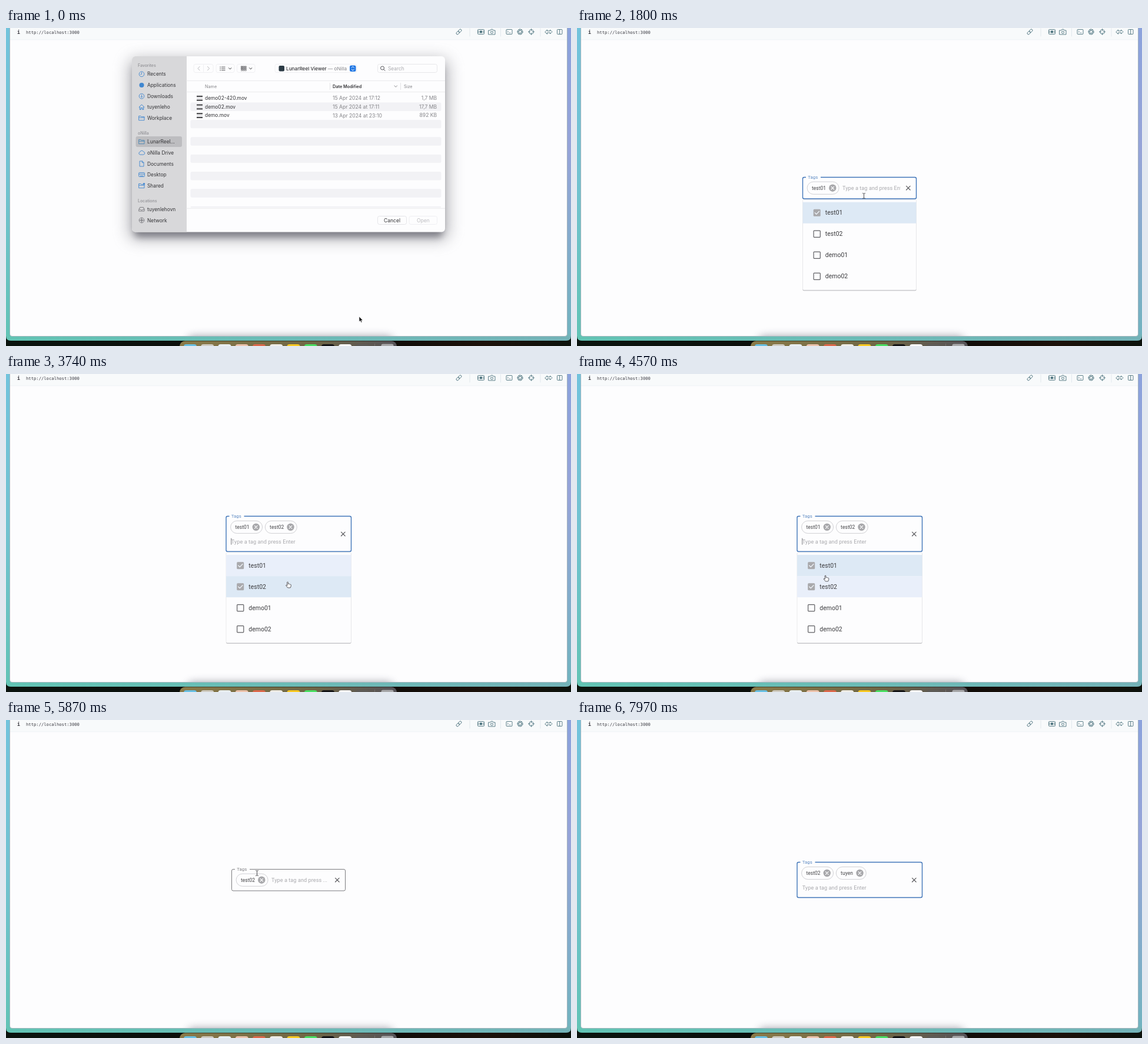
These frames come from a looping animation (960 px wide and 540 px high, 8000 ms). An HTML page:

```html
<!DOCTYPE html>
<html lang="en">
<head>
<meta charset="utf-8">
<title>Tag input</title>
<style>
html, body { margin: 0; width: 100%; height: 100%; overflow: hidden; background: #fdfdfe; }
svg { display: block; width: 960px; height: 540px; }
text { white-space: pre; }
.ui { font-family: Inter, sans-serif; }
.form { font-family: Roboto, sans-serif; letter-spacing: .008em; }
.mono { font-family: "DejaVu Sans Mono", monospace; }
.line { fill: none; stroke-linecap: round; stroke-linejoin: round; }
</style>
</head>
<body>
<svg viewBox="0 0 960 540" xmlns="http://www.w3.org/2000/svg">
  <defs>
    <linearGradient id="left" x1="0" y1="0" x2="0" y2="1">
      <stop offset="0" stop-color="#72c3dc"/><stop offset=".5" stop-color="#72c2d0"/><stop offset="1" stop-color="#62c3b6"/>
    </linearGradient>
    <linearGradient id="right" x1="0" y1="0" x2="0" y2="1">
      <stop offset="0" stop-color="#8ba2dc"/><stop offset=".4" stop-color="#96a4d8"/><stop offset="1" stop-color="#72b3c0"/>
    </linearGradient>
    <linearGradient id="base">
      <stop offset="0" stop-color="#62c4b4"/><stop offset="1" stop-color="#74b3b8"/>
    </linearGradient>
    <linearGradient id="shelf">
      <stop offset="0" stop-color="#8a7a48"/><stop offset=".6" stop-color="#6f6645"/><stop offset="1" stop-color="#555258"/>
    </linearGradient>
    <linearGradient id="ground">
      <stop offset="0" stop-color="#0b140f"/><stop offset=".6" stop-color="#0b0a08"/><stop offset=".85" stop-color="#1c110a"/><stop offset="1" stop-color="#0c120c"/>
    </linearGradient>
    <filter id="soft" x="-30%" y="-30%" width="160%" height="160%"><feGaussianBlur stdDeviation="13"/></filter>
    <filter id="near" x="-30%" y="-30%" width="160%" height="160%"><feGaussianBlur stdDeviation="6"/></filter>
    <filter id="glow" x="-10%" y="-100%" width="120%" height="300%"><feGaussianBlur stdDeviation="7"/></filter>
    <clipPath id="page"><rect x="7" y="0" width="946" height="523"/></clipPath>
    <clipPath id="side"><rect x="214" y="48" width="92.5" height="299"/></clipPath>
    <clipPath id="hint"><rect x="445" y="258" width="104.5" height="28"/></clipPath>
  </defs>
  <g id="desk"></g>
  <g id="form"></g>
  <g id="dialog"></g>
  <g id="pointer"></g>
</svg>
<script>
const LOOP = 8000, BG = '#fdfdfe';
const byId = id => document.getElementById(id);

const rect = (x, y, w, h, fill, r = 0, extra = '') =>
  `<rect x="${x}" y="${y}" width="${w}" height="${h}" rx="${r}" fill="${fill}" ${extra}/>`;
const box = (x, y, w, h, color, r = 0, width = 1, fill = 'none') =>
  rect(x, y, w, h, fill, r, `stroke="${color}" stroke-width="${width}"`);
const path = (d, color, width = 1, fill = 'none') =>
  `<path class="line" d="${d}" style="fill:${fill}" stroke="${color}" stroke-width="${width}"/>`;
const dot = (x, y, r, fill, extra = '') => `<circle cx="${x}" cy="${y}" r="${r}" fill="${fill}" ${extra}/>`;
const ring = (x, y, r, color, width = .9) => dot(x, y, r, 'none', `stroke="${color}" stroke-width="${width}"`);
// Text is placed by its vertical middle.
const label = (s, x, y, size, fill, cls = 'ui', extra = '') =>
  `<text class="${cls}" x="${x}" y="${(y + size * .36).toFixed(2)}" font-size="${size}" fill="${fill}" ${extra}>${s}</text>`;
const at = (x, y, s) => `<g transform="translate(${x} ${y})">${s}</g>`;
const cross = (x, y, r, color, width) =>
  path(`M${x - r} ${y - r}L${x + r} ${y + r}M${x + r} ${y - r}L${x - r} ${y + r}`, color, width);

function drawDesk() {
  const ink = '#4a717c';
  let s = rect(0, 0, 960, 540, 'url(#ground)');
  s += '<path d="M0 0H960V523Q960 531 952 531H8Q0 531 0 523Z" fill="url(#base)"/>';
  s += rect(0, 0, 8, 520, 'url(#left)') + rect(952, 0, 8, 520, 'url(#right)');
  s += `<path d="M6.5 -1H953.5V519Q953.5 523.5 949 523.5H11Q6.5 523.5 6.5 519Z" fill="${BG}" stroke="#9cabb4" stroke-width=".8"/>`;
  s += '<g clip-path="url(#page)">' + rect(308, 523, 350, 24, '#6c6c7c', 10, 'filter="url(#glow)" opacity=".6"') + '</g>';
  s += rect(7, 0, 946, 20, '#f8fafb') + rect(7, 19.7, 946, .6, '#e9ecee');
  s += label('i', 19, 7, 8, '#33333a', 'mono', 'font-weight="bold"');
  s += label('http://localhost:3000', 34, 7, 7.2, '#3b3b42', 'mono');

  for (const x of [788, 840.5, 908]) s += path(`M${x} 1V14`, '#dbe4ea', .8);
  s += at(769.5, 6.5, `<g transform="rotate(-45)">${box(-5.5, -2, 6, 4, ink, 2, .9)}${box(-.5, -2, 6, 4, ink, 2, .9)}</g>`);
  s += box(801.5, 2.5, 11, 8, ink, 1, .9) + dot(807, 6.5, 2.3, ink) + path('M803 4.5v4M811 4.5v4', ink, .8);
  s += path('M820 4H823L824 2.3H827L828 4H831V11H820Z', ink, .9) + ring(825.5, 7.2, 2, ink);
  s += box(850, 2.5, 10, 8, ink, 1, .9) + path('M852 5l1.5 1.3L852 7.6M855 8h2', ink, .7);
  s += ring(873.5, 6.5, 4.5, ink);
  for (let a = 0; a < 360; a += 60) s += at(873.5, 6.5, `<g transform="rotate(${a})">${path('M-1.2 -2L3 -3.3', ink, .9)}</g>`);
  s += ring(892.5, 6.5, 3.8, ink) + path('M892.5 1.5v3M892.5 8.5v3M887.5 6.5h3M894.5 6.5h3', ink, .9);
  s += path('M916 6.5L919.5 3V5H924.5V3L928 6.5L924.5 10V8H919.5V10Z', ink, .9);
  s += box(936.5, 2.5, 8.5, 8, ink, .8, .9) + path('M940.7 2.5v8', ink, .9);

  s += rect(295, 531.5, 369, 22, 'url(#shelf)', 9);
  const apps = ['#69bfe2', '#cfcbc2', '#e8eef0', '#ecc2ac', '#dc684c', '#eeece6', '#f7c822', '#4ade62', '#151517', '#f7f7f8', '#5d5b58'];
  apps.forEach((c, i) => s += rect(302 + i * 29.25, 537, 22, 12, c, 4));
  s += rect(626, 536, .8, 6, '#7b7772') + rect(637.5, 536.5, 21, 12, '#a8a8aa', 3);
  byId('desk').innerHTML = s;
}

const folder = (y, c) => path(`M226 ${y - 3.5}h3l1 1.2h5v6h-9zM226 ${y - .8}h9`, c, .9);

function drawDialog() {
  const blue = '#3f86d0', grey = '#77777c', ink = '#333336', dim = '#848488', faint = '#ececef';
  let s = rect(208, 52, 544, 308, '#76767e', 14, 'filter="url(#soft)" opacity=".5"');
  s += rect(218, 64, 524, 291, '#54545e', 8, 'filter="url(#near)" opacity=".6"');
  s += rect(214, 48, 532, 298.5, BG, 6);
  s += '<g clip-path="url(#side)">' + rect(214, 48, 110, 298.5, '#d8d8da', 6) + '</g>';
  s += rect(306, 48, .7, 298, '#d2d2d5');
  s += rect(220.5, 184, 78.5, 18, '#bdbdc0', 3);

  const heads = [['Favorites', 63.8], ['oNilla', 178.7], ['Locations', 293.3]];
  for (const [t, y] of heads) s += label(t, 224, y, 6.9, '#98989c', 'ui', 'font-weight="600"');
  const places = ['Recents', 'Applications', 'Downloads', 'tuyenleho', 'Workplace', '',
    'LunarReel…', 'oNilla Drive', 'Documents', 'Desktop', 'Shared', '', 'tuyenlehovn', 'Network'];
  places.forEach((t, i) => s += label(t, 240, 78.2 + i * 18.75 + Math.floor(i / 6) * 2.4, 8.35, ink));

  s += ring(230.5, 78.3, 4.3, blue) + path('M230.5 75.5v3h-2', blue, .8);
  s += dot(230.5, 97, 4, blue);
  s += ring(230.5, 115.8, 4.3, blue) + path('M230.5 113.3v4.6m-1.8-1.8l1.8 1.8l1.8-1.8', blue, .8);
  s += path('M226 134.5L230.5 130L235 134.5M227.3 134v4.5h2v-3h2.4v3h2V134', blue, 1);
  s += folder(153, blue) + folder(193, '#4a86b4');
  s += path('M227.5 215a2.3 2.3 0 0 1 .3-4.5a3 3 0 0 1 5.7-.4a2.5 2.5 0 0 1 .3 4.9z', blue, .9);
  s += path('M227.5 226h4l2.5 2.5v6.5h-6.5zM231.3 226v2.7h2.7', blue, .9);
  s += box(225.7, 245.5, 9.6, 7, blue, .8, .9) + path('M226 248h9M228 251h5', blue, 1);
  s += folder(268, blue) + dot(234.5, 264.5, 1.6, blue);
  s += path('M226 308l1.5-3.5h6L235 308v3h-9zM226 308h2.5l1 1.3h2l1-1.3h2.5', grey, .9);
  s += ring(230.5, 326.5, 4.3, grey) + ring(230.5, 326.5, 1.8, grey, .8) + path('M226.5 326.5h8M230.5 322.5v8', grey, .7);

  s += box(319, 61.5, 33, 14, faint, 3, .8) + path('M335.5 63v11', faint, .8);
  s += path('M329 65.5l-3 3.2l3 3.2M342.5 65.5l3 3.2l-3 3.2', '#b9b9bd');
  s += box(357, 61.5, 31, 14, faint, 3, .8) + box(392.5, 61.5, 30.5, 14, faint, 3, .8);
  for (let i = 0; i < 3; i++) {
    const y = 65.7 + i * 2.8;
    s += rect(363.5, y, 1.2, 1.2, ink) + rect(366, y, 6.5, 1, '#5a5a5e');
    for (let j = 0; j < 3; j++) s += box(399.5 + j * 3.2, y - .7, 2.2, 1.8, '#5a5a5e', 0, .8);
  }
  s += path('M378.5 67.7l2.2 2.2l2.2-2.2M413.5 67.7l2.2 2.2l2.2-2.2', ink);
  s += box(457, 61.5, 139, 14, faint, 3, .8) + rect(463.5, 64, 9.5, 9.5, '#2b3a44', 2);
  s += label('LunarReel Viewer', 476, 68.7, 8.2, ink, 'ui', 'font-weight="500"') + label('— oNilla', 547, 68.7, 8.2, dim);
  s += rect(584, 63.5, 10.5, 10.5, '#2479e4', 2.5) + path('M287.3 0M587.3 67.4l2-2l2 2M587.3 70.2l2 2l2-2', '#fff');
  s += box(631.5, 61.5, 101, 14, '#e2e2e5', 3, .8) + ring(639.5, 68, 3, '#55555a', 1) + path('M641.8 70.3l2.2 2.3', '#55555a');
  s += label('Search', 649, 69, 8.4, '#a9a9ad');

  s += rect(306, 89.3, 440, .8, '#e5e5e8') + rect(306, 108.3, 440, .8, '#e5e5e8');
  s += rect(550, 93, .8, 12, '#dcdce0') + rect(670, 93, .8, 12, '#dcdce0');
  s += label('Name', 338, 99, 7.25, dim) + label('Date Modified', 555, 99, 7.3, ink, 'ui', 'font-weight="600"') + label('Size', 676, 99, 7.25, dim);
  s += path('M660 98l2.3 2.2l2.3-2.2', '#7c7c80', .9);
  for (let i = 0; i < 7; i++) s += rect(313.5, 126.6 + i * 29.35, 426, i < 6 ? 14.4 : 2.5, '#f2f2f5', 2.5);
  const files = [['demo02-420.mov', '15 Apr 2024 at 17:12', '1,7 MB'], ['demo02.mov', '15 Apr 2024 at 17:11', '17,7 MB'], ['demo.mov', '13 Apr 2024 at 23:10', '892 KB']];
  files.forEach(([name, date, size], i) => {
    const y = 119 + i * 14.7;
    s += rect(324, y - 4, 10, 8.6, '#e8e8ea') + rect(324, y - 4, 10, 1.8, ink) + rect(324, y + 2.8, 10, 1.8, ink);
    s += label(name, 338, y, 8.4, ink) + label(date, 555, y, 8.6, dim) + label(size, 732, y, 8.5, dim, 'ui', 'text-anchor="end"');
  });
  s += rect(306, 305.8, 440, .8, '#e5e5e8');
  s += box(631.5, 319.5, 49, 14, '#dfdfe3', 3, .8) + label('Cancel', 656, 326.5, 8.5, ink, 'ui', 'text-anchor="middle"');
  s += box(685, 319.5, 47.5, 14, '#ededf0', 3, .8) + label('Open', 709, 326.5, 8.6, '#bcbcc0', 'ui', 'text-anchor="middle"');
  byId('dialog').innerHTML = s;
}

// Pointer route: time, x, y.
const route = [
  [0, 600, 490], [130, 600, 490], [820, 478.5, 286.5], [1050, 487.5, 278], [1500, 487.5, 280], [1800, 487.5, 285],
  [2000, 487.5, 285], [2600, 478.5, 353], [3850, 478.5, 353], [4480, 422, 342.3], [4600, 422, 342],
  [5000, 424, 261], [5450, 424.5, 261], [5800, 426.5, 260], [5900, 426.5, 260], [6200, 484, 273], [LOOP, 484, 273]
];
function pointerAt(t) {
  const i = Math.max(1, route.findIndex(k => k[0] > t));
  const [t0, x0, y0] = route[i - 1], [t1, x1, y1] = route[i];
  const p = (t - t0) / (t1 - t0), e = p * p * (3 - 2 * p);
  return [x0 + (x1 - x0) * e, y0 + (y1 - y0) * e];
}

const OPEN = 1180, PICK = 3350, DROP = 5350, REOPEN = 6250, TYPE = 6520, KEY = 140, ENTER = 7400;
const WORD = 'tuyen', OPTIONS = ['test01', 'test02', 'demo01', 'demo02'];

function stateAt(t) {
  const typing = t >= TYPE && t < ENTER;
  const typed = typing ? WORD.slice(0, 1 + Math.floor((t - TYPE) / KEY)) : '';
  const tags = t < PICK ? ['test01'] : t < DROP ? ['test01', 'test02'] : t < ENTER ? ['test02'] : ['test02', WORD];
  const focused = (t >= OPEN && t < DROP) || t >= REOPEN;
  const options = focused && t < ENTER ? OPTIONS.filter(o => o.includes(typed)) : [];
  const start = t >= ENTER ? ENTER : typing ? TYPE + KEY * (typed.length - 1) : t >= REOPEN ? REOPEN : OPEN;
  const caret = focused && Math.floor((t - start) / 530) % 2 === 0;
  return { tags, typed, focused, options, caret, hidden: t >= TYPE };
}

function chip(text, x, y) {
  const w = text === WORD ? 51 : 54, cx = x + w - 10.8;
  return box(x, y - 10.6, w, 21.2, '#c6c6ca', 10.6, .8) + label(text, x + 7.8, y, 8.45, '#434346', 'form')
    + dot(cx, y, 6.2, '#a8a8ab') + cross(cx, y, 2.3, BG, 1.2);
}

function drawForm(st, px, py) {
  const two = st.tags.length > 1;
  const x = two ? 374 : 383.5, w = two ? 212.5 : 193;
  const y = two ? 241.5 : 253.5, h = two ? 60 : 36.5;
  const inside = px > x && px < x + w;
  const hover = !st.hidden && inside && py > y && py < y + h - 2.7;
  const edge = st.focused ? '#3f74b8' : hover ? '#6c6c70' : '#cbcbce';
  let s = box(x, y, w, h, edge, 2.5, st.focused ? 1.4 : .9);
  s += rect(x + 5.5, y - 2, 25, 4, BG) + label('Tags', x + 8.7, y, 7.8, st.focused ? '#5f8cc4' : '#838387', 'form');

  const chipY = two ? 260 : 271.7;
  st.tags.forEach((tag, i) => s += chip(tag, x + 7.6 + i * 58.7, chipY));
  const tx = two ? 382.7 : 451, ty = two ? 284.3 : 271.7;
  const hint = two || st.focused ? 'Type a tag and press Enter' : 'Type a tag and press ...';
  const content = label(st.typed || hint, tx, ty, 9.1, st.typed ? '#434346' : '#a9a9ad', 'form');
  s += two ? content : `<g clip-path="url(#hint)">${content}</g>`;
  if (st.caret) s += rect(tx - .3 + [0, 3.1, 8.2, 12.6, 17.5, 22.6][st.typed.length], ty - 5.5, .8, 11, '#55555a');
  if (st.focused || hover) s += cross(x + w - 13.7, 271.7, 3.3, '#58585c', 1.2);

  const top = y + h + 5.7, n = st.options.length;
  const over = inside && py > top ? Math.floor((py - top) / 36) : -1;
  if (n) {
    const firstPicked = st.options.findIndex(o => st.tags.includes(o));
    const active = over >= 0 && over < n ? over : firstPicked;
    const ph = n * 36 + 9.5;
    s += rect(x, y + h + 2.8, w, ph, '#b4b4b8', 2) + box(x, y + h + 1.5, w, ph, '#e6e6e9', 2, .8, BG);
    st.options.forEach((o, i) => {
      const cy = top + 18 + i * 36, picked = st.tags.includes(o);
      const fill = i === active ? (picked ? '#dde9f5' : '#f4f4f6') : picked ? '#e9effa' : '';
      if (fill) s += rect(x, cy - 18, w, 36, fill);
      const bx = x + 18.2;
      s += picked
        ? rect(bx, cy - 6, 12, 12, '#a9a9ac', 1.5) + path(`M${bx + 2.5} ${cy}l2.5 2.6l4.8-5`, '#eef2f8', 1.3)
        : box(bx + .4, cy - 5.6, 11.2, 11.2, '#5e5e62', 1, 1.2);
      s += label(o, x + 38.2, cy, 10.4, '#3b3b3e', 'form');
    });
  }
  byId('form').innerHTML = s;

  const onCross = st.tags.some((tag, i) => Math.hypot(px - (x + 50.8 + i * 58.7), py - chipY) < 6.5);
  return (over >= 0 && over < n) || onCross ? 'hand' : hover ? 'beam' : 'arrow';
}

const cursors = {
  arrow: path('M0 0V8.8L2 7L3.5 10.2L5 9.5L3.6 6.5H6.2Z', BG, .6, '#151517'),
  beam: path('M-2 -4.5Q0 -4.5 0 -3.3Q0 -4.5 2 -4.5M0 -3.3V3.3M-2 4.5Q0 4.5 0 3.3Q0 4.5 2 4.5', '#3c3c40', .9),
  hand: path('M-.8 .6Q0 -1 .9 .6V3.6Q2 2.8 2.7 3.8Q3.8 3.2 4.3 4.3Q5.8 4 5.8 5.4Q6 8 4.6 10H.2Q-1.8 7.6-3 5.9Q-2.6 4.6-.8 6Z', '#48484c', .9, BG)
};

function draw(t) {
  const st = stateAt(t), [px, py] = pointerAt(t);
  const kind = drawForm(st, px, py);
  byId('pointer').innerHTML = st.hidden ? '' : at(px.toFixed(2), py.toFixed(2), cursors[kind]);
  byId('dialog').setAttribute('opacity', Math.min(1, Math.max(0, (360 - t) / 160)).toFixed(3));
}

drawDesk();
drawDialog();
const began = performance.now();
function tick() {
  draw((performance.now() - began) % LOOP);
  requestAnimationFrame(tick);
}
tick();
</script>
</body>
</html>
```
